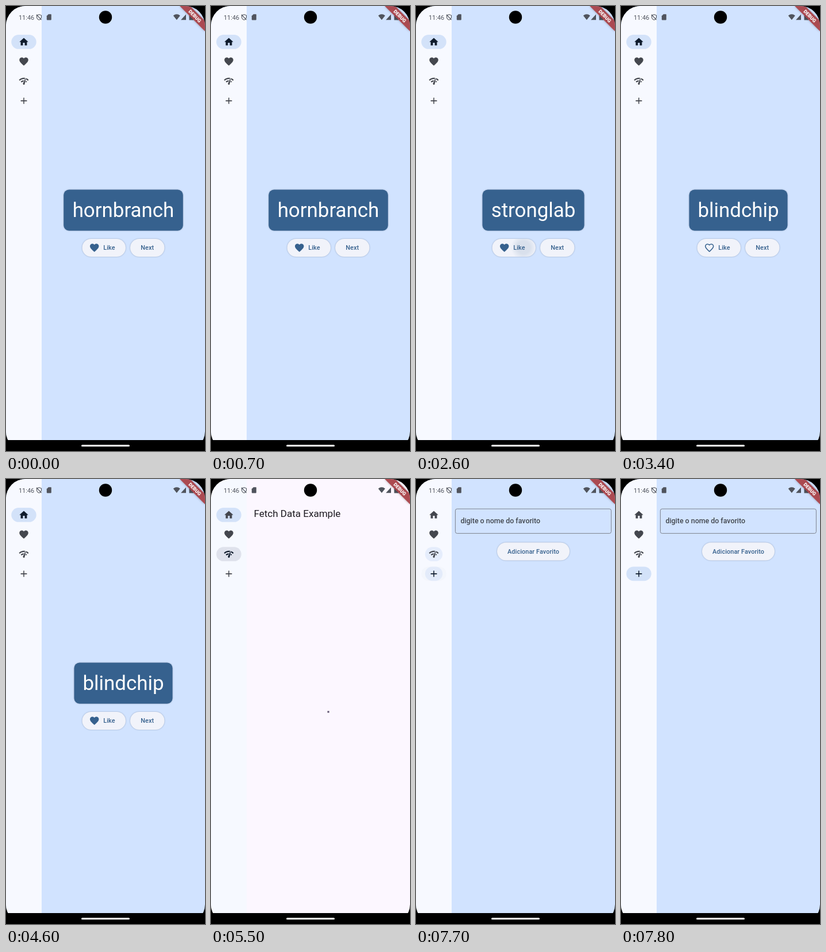
An HTML page that plays this animation: 346 by 774 pixels, repeating every 8000 ms.

```html
<!DOCTYPE html>
<html lang="en">
<head>
<meta charset="utf-8">
<title>App walkthrough</title>
<style>
  html, body { margin: 0; width: 100%; height: 100%; overflow: hidden; background: #000; }
  svg { display: block; width: 100vw; height: 100vh; }
  text { font-family: Roboto, Arial, sans-serif; fill: #1d1b20; }
  .mid { text-anchor: middle; }
  .raised { filter: drop-shadow(0 .9px .8px rgba(20, 30, 50, .32)); }
  .label { font-size: 10.85px; font-weight: 500; letter-spacing: .08px; fill: #36618e; }
  .status { fill: #50545d; }
</style>
</head>
<body>
<svg viewBox="0 0 346 774">
  <defs>
    <clipPath id="screen"><rect width="346" height="774" rx="34"/></clipPath>
    <clipPath id="likeShape"><rect x="132.5" y="405" width="75.5" height="31" rx="15.5"/></clipPath>
    <clipPath id="nextShape"><rect x="216" y="405" width="59.5" height="31" rx="15.5"/></clipPath>
    <radialGradient id="ink">
      <stop offset=".5" stop-color="#36618e" stop-opacity=".13"/>
      <stop offset="1" stop-color="#36618e" stop-opacity="0"/>
    </radialGradient>
    <filter id="soft" x="-30%" y="-30%" width="160%" height="160%"><feGaussianBlur stdDeviation="2"/></filter>
    <path id="heart" d="M12 21.35l-1.45-1.32C5.4 15.36 2 12.28 2 8.5 2 5.42 4.42 3 7.5 3c1.74 0 3.41.81 4.5 2.09C13.09 3.81 14.76 3 16.5 3 19.58 3 22 5.42 22 8.5c0 3.78-3.4 6.86-8.55 11.54z"/>
    <path id="home" d="M10 20v-6h4v6h5v-8h3L12 3 2 12h3v8z"/>
    <path id="check" d="M15.9 5c-.17 0-.32.09-.41.23l-.07.15-5.18 11.65c-.16.29-.26.61-.26.96 0 1.11.9 2.01 2.01 2.01.96 0 1.77-.68 1.96-1.59l.01-.03L16.4 5.5c0-.28-.22-.5-.5-.5zM1 9l2 2c2.88-2.88 6.79-4.08 10.53-3.62l1.19-2.68C9.89 3.84 4.74 5.27 1 9zm20 2l2-2c-1.64-1.64-3.55-2.82-5.59-3.57l-.53 2.82c1.5.62 2.9 1.53 4.12 2.75zm-4 4l2-2c-.8-.8-1.7-1.42-2.66-1.89l-.55 2.92c.42.27.83.59 1.21.97zM5 13l2 2c1.13-1.13 2.56-1.79 4.03-2l1.28-2.88c-2.63-.08-5.3.87-7.31 2.88z"/>
    <path id="plus" d="M19 13h-6v6h-2v-6H5v-2h6V5h2v6h6z"/>
  </defs>

  <rect width="346" height="774"/>
  <g clip-path="url(#screen)">
    <rect id="page" width="346" height="774"/>
    <rect id="railBg" width="62" height="774"/>
    <g id="rail"></g>

    <g id="wordsPage">
      <rect id="card" class="raised" y="319.5" height="71.3" rx="9.3" fill="#36618e"/>
      <text id="word" class="mid" x="204" y="367.2" font-size="34.9" style="fill:#fff"></text>
      <rect class="raised" x="132.5" y="405" width="75.5" height="31" rx="15.5" fill="#f1f3fa"/>
      <rect class="raised" x="216" y="405" width="59.5" height="31" rx="15.5" fill="#f1f3fa"/>
      <g clip-path="url(#likeShape)"><circle id="likeInk" cx="187" cy="420" fill="url(#ink)"/></g>
      <g clip-path="url(#nextShape)"><circle id="nextInk" cx="246" cy="420" fill="url(#ink)"/></g>
      <g transform="translate(144.4 411.2) scale(.775)">
        <use id="liked" href="#heart" fill="#36618e"/>
        <use id="unliked" href="#heart" transform="translate(1.2 1.2) scale(.9)" fill="none" stroke="#36618e" stroke-width="2.2"/>
      </g>
      <text class="label" x="169.3" y="424.4">Like</text>
      <text class="label mid" x="245.7" y="424.4">Next</text>
    </g>

    <g id="fetchPage">
      <text x="74.4" y="66.3" font-size="17.05">Fetch Data Example</text>
      <path id="spinner" fill="none" stroke="#5f5470" stroke-width="3.1" stroke-linecap="square"/>
      <text id="result" class="mid" x="204" y="423" font-size="10.85" letter-spacing=".19">quidem molestiae enim - 1</text>
    </g>

    <g id="addPage">
      <rect x="68.4" y="52" width="271" height="42.6" rx="3.1" fill="none" stroke="#73777f" stroke-width=".9"/>
      <text x="77.4" y="77.2" font-size="12.4" font-weight="500" style="fill:#42474e">digite o nome do favorito</text>
      <rect class="raised" x="141" y="110.5" width="126" height="31" rx="15.5" fill="#f1f3fa"/>
      <text class="label mid" x="204" y="130">Adicionar Favorito</text>
    </g>

    <text class="status" x="22" y="23.5" font-size="10.9" style="fill:#50545d">11:46</text>
    <g fill="none" stroke="#50545d" stroke-width="1.1">
      <path d="M57.5 14.8l4 1.5v3.2q-.4 3.5-4 4.7-3.600-1.200-4-4.700v-3.200z"/>
      <path d="M53 15l8.500 9"/>
    </g>
    <path class="status" d="M73.800 14.300h4.200q.8 0 .8.800v8.500q0 .8-.8.800h-6.400q-.8 0-.8-.8v-6.300z"/>
    <path class="status" d="M290.800 16.700q6-4.800 12 0l-6 7.500zM304 24.200h9v-9.800z"/>
    <path class="status" d="M320.500 14.300h4v1.200h1.500v8.900h-7.500v-8.900h2z"/>
    <path d="M302 0h18l26 26v18z" opacity=".3" filter="url(#soft)"/>
    <path d="M302 0h18l26 26v18z" fill="#ac464c" opacity=".95"/>
    <text class="mid" transform="translate(328.400 17.600) rotate(45)" y="3" font-size="8.500" font-weight="900" style="fill:#fff">DEBUG</text>
    <circle cx="173" cy="19.500" r="11.200"/>
  </g>
  <rect y="755" width="346" height="19"/>
  <rect x="131" y="763.200" width="84" height="3" rx="1.500" fill="#fff"/>
</svg>
<script>
const LOOP = 8000, STEP = 100;
const WORDS = [
  { at: 0, text: 'hornbranch', width: 207.5, likedAt: 0 },
  { at: 1700, text: 'stronglab', width: 177, likedAt: 2600 },
  { at: 3300, text: 'blindchip', width: 171, likedAt: 4200 }
];
// from, to, strength
const LIKE_INK = [[2600, 2700, 1], [2700, 2800, .6], [2800, 2900, .3], [4200, 4600, .6]];
const NEXT_INK = [[1700, 1900, .8], [1900, 2100, .4], [3300, 3400, .8]];
const FETCH_AT = 5500, RESULT_AT = 5700, PRESS_AT = 7600, ADD_AT = 7700;

const $ = id => document.getElementById(id);
const clamp = v => Math.max(0, Math.min(1, v));
const set = (el, attrs) => { for (const k in attrs) el.setAttribute(k, attrs[k]); };
const show = (el, on) => el.setAttribute('display', on ? 'inline' : 'none');

function add(parent, tag, attrs) {
  const el = document.createElementNS('http://www.w3.org/2000/svg', tag);
  set(el, attrs);
  return parent.appendChild(el);
}

const items = ['home', 'heart', 'check', 'plus'].map((icon, i) => {
  const y = 62.4 + 34.15 * i;
  const g = add($('rail'), 'g', { transform: `translate(31 ${y})` });
  const pill = fill => add(g, 'rect', { y: -12.4, height: 24.8, rx: 12.4, fill });
  const press = pill('#dfe2ec'), mark = pill('#d3e2f9');
  set(press, { x: -21.7, width: 43.4 });
  const glyph = add(g, 'use', { href: '#' + icon, transform: 'scale(.775) translate(-12 -12)' });
  return { press, mark, glyph };
});

function drawRail(t) {
  const selected = t >= ADD_AT ? 3 : t >= FETCH_AT ? 2 : 0;
  const toFetch = clamp((t - FETCH_AT) / 200);
  const toAdd = clamp((t - PRESS_AT) / 200);
  const marks = [1 - toFetch, 0, toFetch * (1 - toAdd), toAdd];
  const presses = [0, 0, t >= FETCH_AT ? 1 - toFetch : 0, t >= PRESS_AT ? .3 * (1 - toAdd) : 0];
  items.forEach(({ press, mark, glyph }, i) => {
    const w = 43.4 * (.4 + .6 * marks[i]);
    set(mark, { x: -w / 2, width: w, opacity: marks[i] });
    set(press, { opacity: presses[i] });
    set(glyph, { fill: i === selected ? '#0f1b2c' : '#44474e' });
  });
}

function drawInk(el, spans, t) {
  const span = spans.find(([from, to]) => t >= from && t < to);
  set(el, { opacity: span ? span[2] : 0, r: span ? 22 + 20 * (1 - span[2]) : 0 });
}

function drawWords(t) {
  const now = WORDS.filter(w => w.at <= t).pop();
  $('word').textContent = now.text;
  set($('card'), { x: 204 - now.width / 2, width: now.width });
  show($('liked'), t >= now.likedAt);
  show($('unliked'), t < now.likedAt);
  drawInk($('likeInk'), LIKE_INK, t);
  drawInk($('nextInk'), NEXT_INK, t);
}

function drawFetch(t) {
  const age = t - FETCH_AT, k = clamp(age / 667);
  const start = -Math.PI / 2 + age * .0028;
  const sweep = Math.max(.002, 1.5 * Math.PI * k * k * (3 - 2 * k));
  const at = a => `${204 + 14 * Math.cos(a)} ${419 + 14 * Math.sin(a)}`;
  set($('spinner'), { d: `M${at(start)}A14 14 0 ${sweep > Math.PI ? 1 : 0} 1 ${at(start + sweep)}` });
  show($('spinner'), t < RESULT_AT);
  show($('result'), t >= RESULT_AT);
}

function draw(t) {
  const fetching = t >= FETCH_AT && t < ADD_AT;
  set($('page'), { fill: fetching ? '#fcf7ff' : '#d1e3ff' });
  set($('railBg'), { fill: fetching ? '#f6f9ff' : '#f7f9ff' });
  show($('wordsPage'), t < FETCH_AT);
  show($('fetchPage'), fetching);
  show($('addPage'), t >= ADD_AT);
  drawRail(t);
  drawWords(t);
  drawFetch(t);
}

const begin = performance.now();
function tick() {
  const t = (performance.now() - begin) % LOOP;
  draw(Math.floor(t / STEP) * STEP);
  requestAnimationFrame(tick);
}
tick();
</script>
</body>
</html>
```
